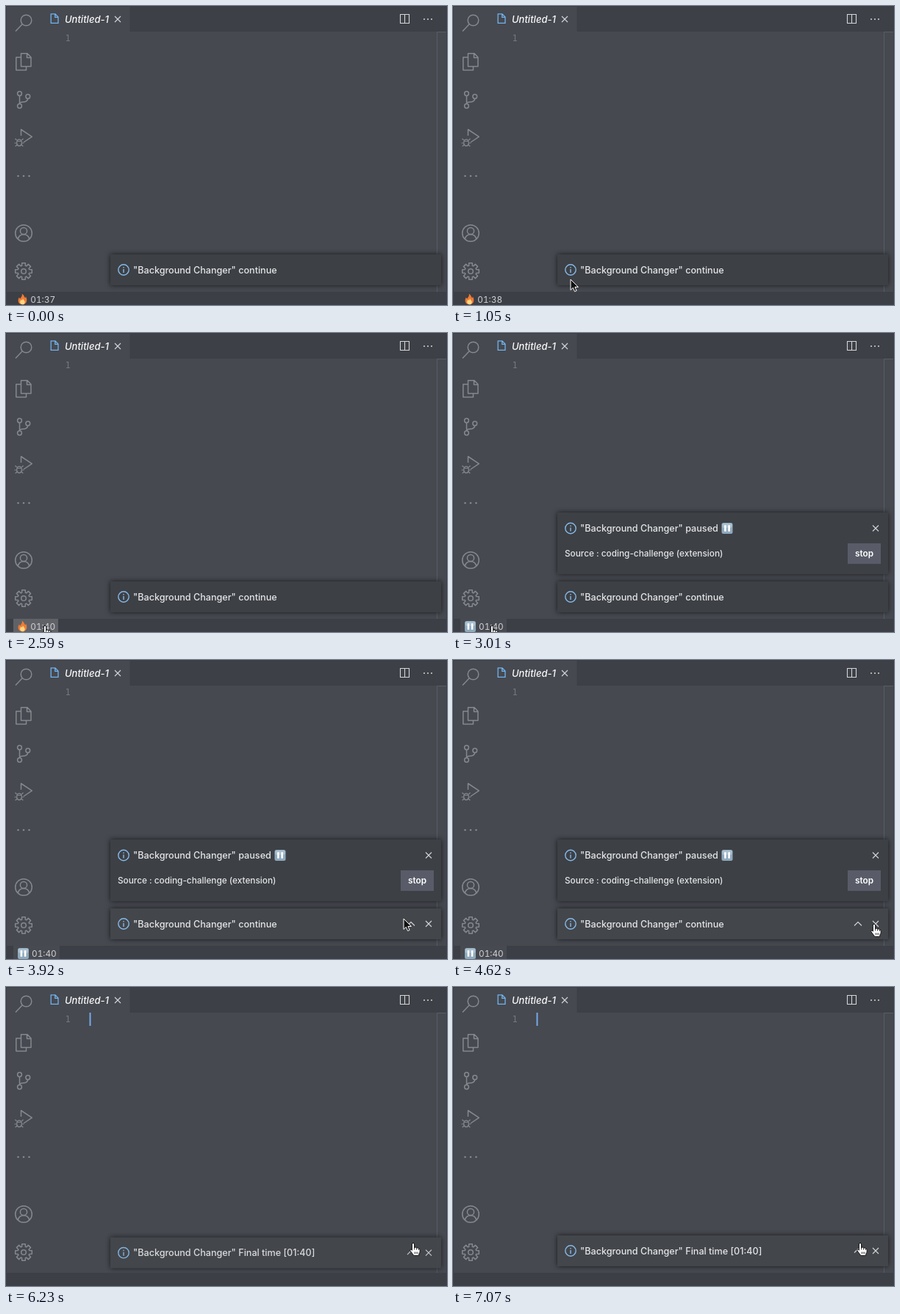
Write an HTML page that moves like this. It is 600x408 px and loops after 7630 ms.

```html
<!DOCTYPE html>
<html lang="en">
<head>
<meta charset="utf-8">
<title>Editor timer</title>
<style>
html, body { margin: 0; width: 100%; height: 100%; overflow: hidden; background: #464950; }
svg { display: block; }
text { font-family: Inter, Roboto, sans-serif; fill: #e4e5e7; white-space: pre; }
.line { fill: none; stroke: #85888d; stroke-width: 1.5; stroke-linejoin: round; }
.thin { fill: none; stroke: #d4d5d7; stroke-width: 1.1; }
.card { fill: #3d4045; filter: drop-shadow(0 0 3.5px rgba(0, 0, 0, .65)); }
.title { font-size: 12.6px; font-weight: 500; }
.small { font-size: 11.8px; font-weight: 500; }
.clock { font-size: 11.8px; font-variant-numeric: tabular-nums; fill: #d0d1d4; }
</style>
</head>
<body>
<svg id="stage" width="600" height="408" viewBox="0 0 600 408">
  <defs>
    <g id="info">
      <circle r="7.2" fill="none" stroke="#86b9e8" stroke-width="1.4"/>
      <path d="M0-1V4M0-4V-2.5" stroke="#86b9e8" stroke-width="1.4"/>
    </g>
    <path id="close" class="thin" d="M-4-4 4 4M4-4-4 4"/>
    <g id="pause">
      <rect x="-7.5" y="-7.5" width="15" height="15" rx="2.5" fill="#8fa9bd"/>
      <rect x="-6.8" y="-6.8" width="13.6" height="6" rx="2" fill="#a9bfce"/>
      <path d="M-2.6-4.3V4.3M2.6-4.3V4.3" stroke="#fff" stroke-width="2.6"/>
    </g>
    <g id="flame">
      <path d="M-1-7.5C3-5 2-2.5 3.8-1.8 4.6-2.4 4.4-3.4 4.2-4 7 0 6.5 7.3 0 7.3-6.5 7.3-7 1-4.6-2.6-4.2-1.3-3.6-.8-3-.8-2.2-3 .4-4.5-1-7.5Z" fill="#ee7b35"/>
      <path d="M.4-1.5C.5 1 3.4 1.8 3.2 4.4 3 6.5 1.6 7.2 0 7.2-2 7.2-3.5 6-3.4 4-3.3 2.4-2.4 1.8-2.2.6-1.5 1.2-1.2 1.6-1 2 0 1 .5 0 .4-1.5Z" fill="#ffd680"/>
    </g>
  </defs>

  <rect width="600" height="408" fill="#464950"/>
  <rect x="168.500" width="431.500" height="35" fill="#3d4046"/>
  <path d="M600 35.500H586.500V390" fill="none" stroke="#5a5d63"/>
  <path d="M0 .5H600M.5 0V408M599.5 0V408" stroke="#3a3d43"/>

  <!-- activity bar -->
  <g class="line">
    <circle cx="27.5" cy="19.5" r="7.3"/><path d="M22.2 24.8 13 34.5"/>
    <path d="M20.5 64.8H29L34 70V82.5H20.5ZM28.5 65V70.5H34M20.5 70H13.8V87.5H27.5V82.5"/>
    <circle cx="18.5" cy="119.5" r="2.9"/><circle cx="18.5" cy="136.5" r="2.9"/><circle cx="29.8" cy="123.5" r="2.9"/>
    <path d="M18.5 122.5V133.5M29.8 126.5Q29 131 23 131 19 131 18.5 133.5"/>
    <path d="M20.5 177V168.5L35.3 178.3 24 186"/>
    <path d="M14.8 185A3.3 3.8 0 0 1 21.2 185V188A3.3 3.8 0 0 1 14.8 188ZM14.8 184.5H21.2M14.5 183 12.5 181M21.5 183 23.5 181M14.5 187H11.5M21.5 187H24.5M14.8 189.5 12.7 191.5M21.2 189.5 23.3 191.5" stroke-width="1.2"/>
    <circle cx="24" cy="310" r="11.3"/><circle cx="24" cy="307" r="4.6"/>
    <path d="M16.3 318Q17.5 311.8 24 311.8T31.7 318"/>
    <path id="gear"/><circle cx="24" cy="362" r="3.3"/>
  </g>
  <g fill="#85888d"><circle cx="16.5" cy="232" r="1.3"/><circle cx="24" cy="232" r="1.3"/><circle cx="31.5" cy="232" r="1.3"/></g>

  <!-- tab row -->
  <path d="M61.2 10.8H67L71 15V23.3H61.2ZM66.8 11V15.3H71" fill="none" stroke="#70b3ee" stroke-width="1.3"/>
  <text x="80" y="22.5" font-size="13" font-style="italic" font-weight="500" style="fill:#f8f8f8">Untitled-1</text>
  <use href="#close" x="152" y="18"/>
  <path class="thin" d="M536.5 11.5H548.5V23.5H536.5ZM542.5 11.5V23.5"/>
  <g fill="#d4d5d7"><circle cx="569" cy="18" r="1"/><circle cx="574" cy="18" r="1"/><circle cx="579" cy="18" r="1"/></g>
  <text x="80.5" y="48" font-size="12" style="font-family:'DejaVu Sans Mono',monospace;fill:#74777d">1</text>
  <rect id="caret" x="113.5" y="35" width="2" height="18" fill="#74a9e8"/>

  <!-- status bar -->
  <rect y="390" width="600" height="18" fill="#3c3f45"/>
  <g id="status">
    <rect id="item" x="10" y="390" height="18"/>
    <use id="fire" href="#flame" x="22.5" y="400"/>
    <use id="held" href="#pause" x="23.5" y="400.5"/>
    <text id="clock" class="clock" y="405"></text>
  </g>

  <!-- notifications: each slot clips its sliding card -->
  <svg id="paused" x="132" width="468" height="100" overflow="hidden"><g>
    <rect class="card" x="10" y="8" width="450" height="84"/>
    <use href="#info" x="28" y="29.5"/>
    <text class="title" x="41" y="34">"Background Changer" paused</text>
    <use href="#pause" x="241" y="29.5"/>
    <use href="#close" x="443" y="29.5"/>
    <text class="small" x="20" y="68">Source : coding-challenge (extension)</text>
    <rect id="button" x="405" y="50" width="45" height="28"/>
    <text class="small" x="427.5" y="68" text-anchor="middle" style="fill:#fff;font-weight:600">stop</text>
  </g></svg>
  <svg id="single" x="132" y="331" width="468" height="59" overflow="hidden"><g>
    <rect class="card" x="10" y="8" width="450" height="42"/>
    <use href="#info" x="28" y="29"/>
    <text id="message" class="title" x="41" y="33.8"></text>
    <g id="tools"><path class="thin" d="M414 31.5 419 26.5 424 31.5"/><use href="#close" x="443" y="29"/></g>
  </g></svg>

  <g id="ring" fill="none">
    <circle stroke="#fff" stroke-width="6"/><circle stroke="#111" stroke-width="3"/>
  </g>
  <g id="pointer">
    <path id="arrow" d="M0 0V14.5L3.3 11.4 5.6 16.6 8.1 15.5 5.9 10.5H10.4Z" fill="#111" stroke="#fff"/>
    <g id="hand" stroke="#111">
      <path d="M-1.6 1Q-1.6-.6 0-.6T1.6 1V6Q2.2 5 3.5 5.2 4.6 5.4 4.7 6.4 5.4 5.7 6.5 6.1 7.4 6.4 7.5 7.3 9 6.7 9.2 8.6V11Q9 13 7.8 14.4V16.4H.6L-.4 14.6Q-2.6 12-4.2 9.6-4.6 8-3 8-2.2 8.4-1.6 9.3Z" fill="#fff"/>
      <path d="M1.6 5.5V8.5M4.7 6.4V8.8M7.5 7.3V9M2 11.5V14M4 11.5V14M6 11.5V14" stroke-width=".8"/>
    </g>
  </g>
</svg>
<script>
const LOOP = 7630, STEP = 70;
const CARD = '#3d4045', CARD_HOVER = '#43464b';
const el = id => document.getElementById(id);
const show = (id, on) => el(id).setAttribute('visibility', on ? 'visible' : 'hidden');
const set = (node, attrs) => { for (const k in attrs) node.setAttribute(k, attrs[k]); };
const tint = (id, hover) => { el(id).querySelector('.card').style.fill = hover ? CARD_HOVER : CARD; };

// time, x, y of the pointer tip
const PATH = [
  [770, 276, 396], [910, 215, 380], [1050, 160, 373], [1190, 106, 377],
  [1330, 85, 385], [1820, 53, 400], [3570, 53, 400], [3640, 80, 397],
  [3780, 330, 366], [3920, 541, 353], [4060, 541, 353], [4410, 573, 361],
  [4900, 573, 361], [5110, 552, 351], [5180, 552, 351], [5390, 554, 350], [LOOP, 554, 350]
];
// start, end, x, y, radius
const CLICKS = [[2450, 2590, 53, 400, 20], [4550, 4620, 573, 362, 28], [5810, 5880, 554, 350, 28]];

function gearPath() {
  let d = '';
  for (let i = 0; i < 8; i++) {
    [[-.3, 8], [-.2, 11.5], [.2, 11.5], [.3, 8]].forEach(([da, r]) => {
      const a = i * Math.PI / 4 + da;
      d += (d ? 'L' : 'M') + (24 + r * Math.cos(a)).toFixed(1) + ' ' + (362 + r * Math.sin(a)).toFixed(1);
    });
  }
  return d + 'Z';
}

function pointerAt(t) {
  const i = Math.max(1, PATH.findIndex(p => p[0] >= t));
  const [a, b] = [PATH[i - 1], PATH[i]];
  const k = (t - a[0]) / (b[0] - a[0]);
  return [a[1] + (b[1] - a[1]) * k, a[2] + (b[2] - a[2]) * k];
}

function slide(id, t, start, height) {
  const k = Math.min(1, Math.max(0, (t - start) / 280));
  const p = 1 - (1 - k) ** 2;
  set(el(id).firstElementChild, { transform: `translate(0 ${height * (1 - p)})`, opacity: p });
}

function drawStatus(t) {
  const held = t >= 2660;
  show('status', t < 5950);
  show('fire', !held && t < 5950);
  show('held', held && t < 5950);
  set(el('item'), { width: held ? 63 : 61, fill: t < 2590 ? 'none' : held ? '#474a50' : '#606268' });
  const second = 37 + [420, 1400, 2450].filter(s => t >= s).length;
  el('clock').textContent = '01:' + second;
  set(el('clock'), { x: held ? 35 : 33.3 });
}

function drawToasts(t) {
  const done = t >= 5950;
  const dropped = t >= 4690;
  el('paused').style.display = t >= 2660 && !done ? '' : 'none';
  set(el('paused'), { y: dropped ? 289 : 237 });
  slide('paused', t, 2660, 84);
  tint('paused', dropped);
  set(el('button'), { fill: dropped ? '#6b6e7b' : '#595c68' });

  el('single').style.display = !dropped || done ? '' : 'none';
  el('message').textContent = '"Background Changer" ' + (done ? 'Final time [01:40]' : 'continue');
  slide('single', t, done ? 6020 : -LOOP, 42);
  tint('single', t >= 3920);
  show('tools', t >= 3920);
}

function drawPointer(t) {
  const on = t >= 770;
  const [x, y] = pointerAt(Math.max(t, 770));
  const hand = (t >= 1540 && t < 3640) || t >= 4200;
  set(el('pointer'), { transform: `translate(${x} ${y})` });
  show('arrow', on && !hand);
  show('hand', on && hand);
  const click = CLICKS.find(c => t >= c[0] && t < c[1]);
  show('ring', click);
  if (click) {
    set(el('ring'), { transform: `translate(${click[2]} ${click[3]})` });
    for (const c of el('ring').children) set(c, { r: click[4] });
  }
}

function draw(now) {
  const t = Math.floor(now % LOOP / STEP) * STEP;
  drawStatus(t);
  drawToasts(t);
  drawPointer(t);
  show('caret', (t >= 6090 && t < 6580) || t >= 7070);
}

set(el('gear'), { d: gearPath() });
const start = performance.now();
function tick() {
  draw(performance.now() - start);
  requestAnimationFrame(tick);
}
tick();
</script>
</body>
</html>
```
